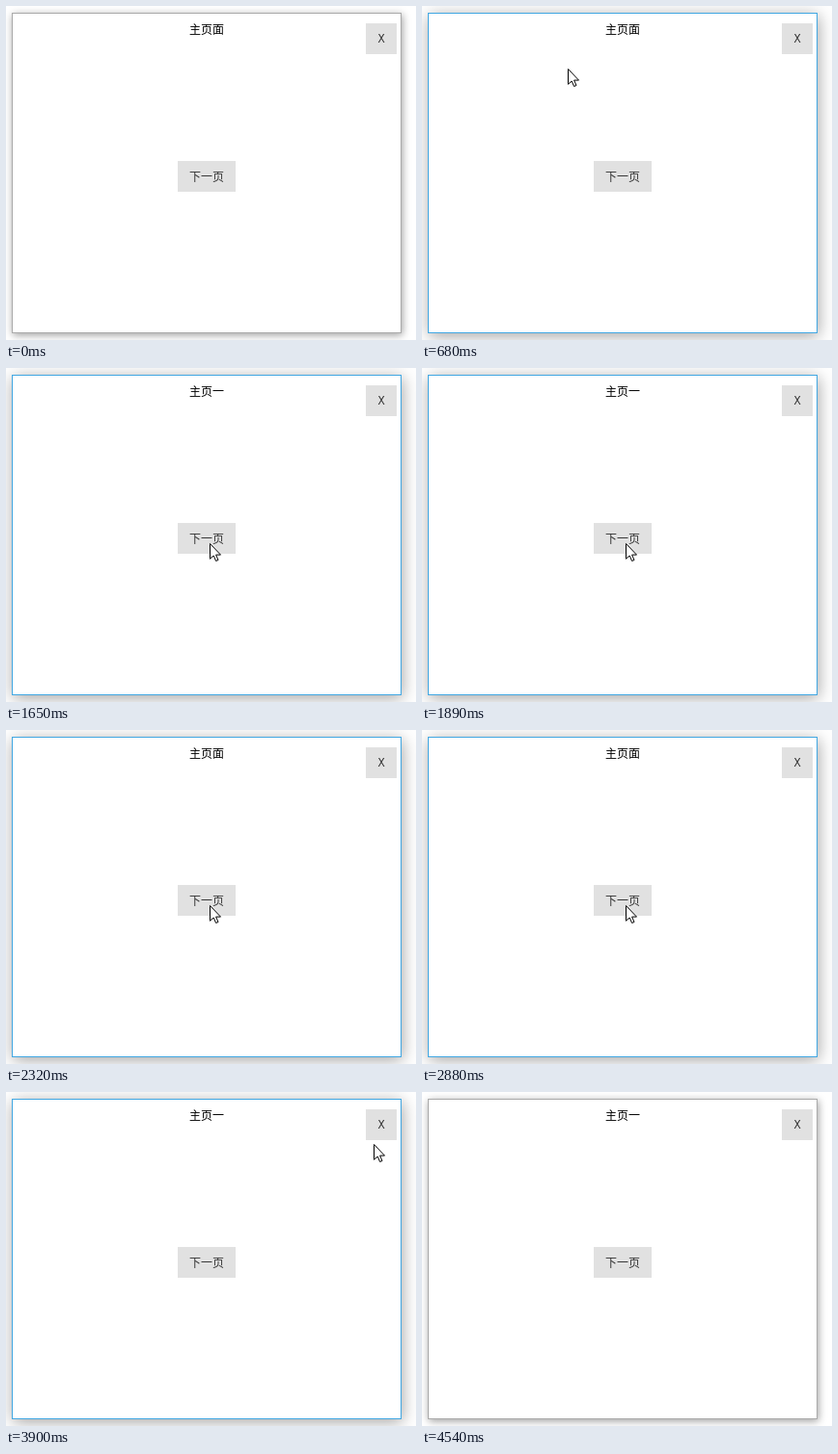
Animation of 425 by 347 pixels, one loop 4.67 s. Source, as an HTML page:

```html
<!DOCTYPE html>
<html lang="zh-CN">
<head>
<meta charset="utf-8">
<style>
  html, body { margin: 0; width: 100%; height: 100%; overflow: hidden; background: #fff; }
  #win {
    position: absolute; left: 6px; top: 7px; width: 404px; height: 333px;
    box-sizing: border-box; background: #fff; border: 1px solid #aaa;
    box-shadow: 1px 2px 8px rgba(0, 0, 0, .38);
  }
  #win.active {
    border-color: #41a7e2;
    box-shadow: 1px 3px 16px rgba(0, 0, 0, .36);
  }
  svg { position: absolute; left: 0; top: 0; }
  text { font: 12px "Noto Sans CJK SC", "Noto Sans CJK", sans-serif; text-anchor: middle; }
  .x { font: 12px "Liberation Mono", monospace; }
</style>
</head>
<body>
<div id="win"></div>
<svg width="425" height="347">
  <g id="page">
    <text id="title" x="208" y="29">主页面</text>
    <g fill="#e1e1e1">
      <rect x="178" y="161" width="60" height="32"/>
      <rect x="373" y="18" width="32" height="32"/>
    </g>
    <g fill="#333">
      <text x="208" y="182">下一页</text>
      <text class="x" x="389" y="38">X</text>
    </g>
  </g>
  <path id="cursor" d="M.5 .5V16.3L4.2 13 6.6 18.5 9 17.5 6.6 12.1H11.5Z" fill="#fff" stroke="#000"/>
</svg>
<script>
const LOOP = 4670, STEP = 70;
const $ = id => document.getElementById(id);
const win = $('win'), page = $('page'), title = $('title'), cursor = $('cursor');

// Pointer moves; it rests at the end of each until the next begins
const moves = [
  { start: 60, end: 500, from: [395, 338], to: [149, 31] },
  { start: 680, end: 1080, from: [151, 65], to: [211, 182] },
  { start: 3380, end: 3900, from: [215, 177], to: [381, 54] },
  { start: 3950, end: 4470, from: [381, 54], to: [416, 342] }
];

const within = (t, a, b) => t >= a && t < b;
const ease = p => p * p * (3 - 2 * p);

function pointer(t) {
  const { start, end, from, to } = moves.filter(m => m.start <= t).pop();
  const steps = Math.round((end - start) / STEP);
  const p = Math.min(1, Math.floor((t - start) / (end - start) * steps) / steps);
  return from.map((a, i) => Math.round(a + (to[i] - a) * ease(p)));
}

function draw(t) {
  const blank = within(t, 1570, 1650) || within(t, 2940, 3000);
  const second = within(t, 1570, 2320) || t >= 2940;
  const present = within(t, 60, 4540);
  win.classList.toggle('active', within(t, 500, 4540));
  page.style.display = blank ? 'none' : '';
  title.textContent = second ? '主页一' : '主页面';
  cursor.style.display = present ? '' : 'none';
  if (present) cursor.setAttribute('transform', `translate(${pointer(t)})`);
}

const start = performance.now();
function tick() {
  draw((performance.now() - start) % LOOP);
  requestAnimationFrame(tick);
}
tick();
</script>
</body>
</html>
```
